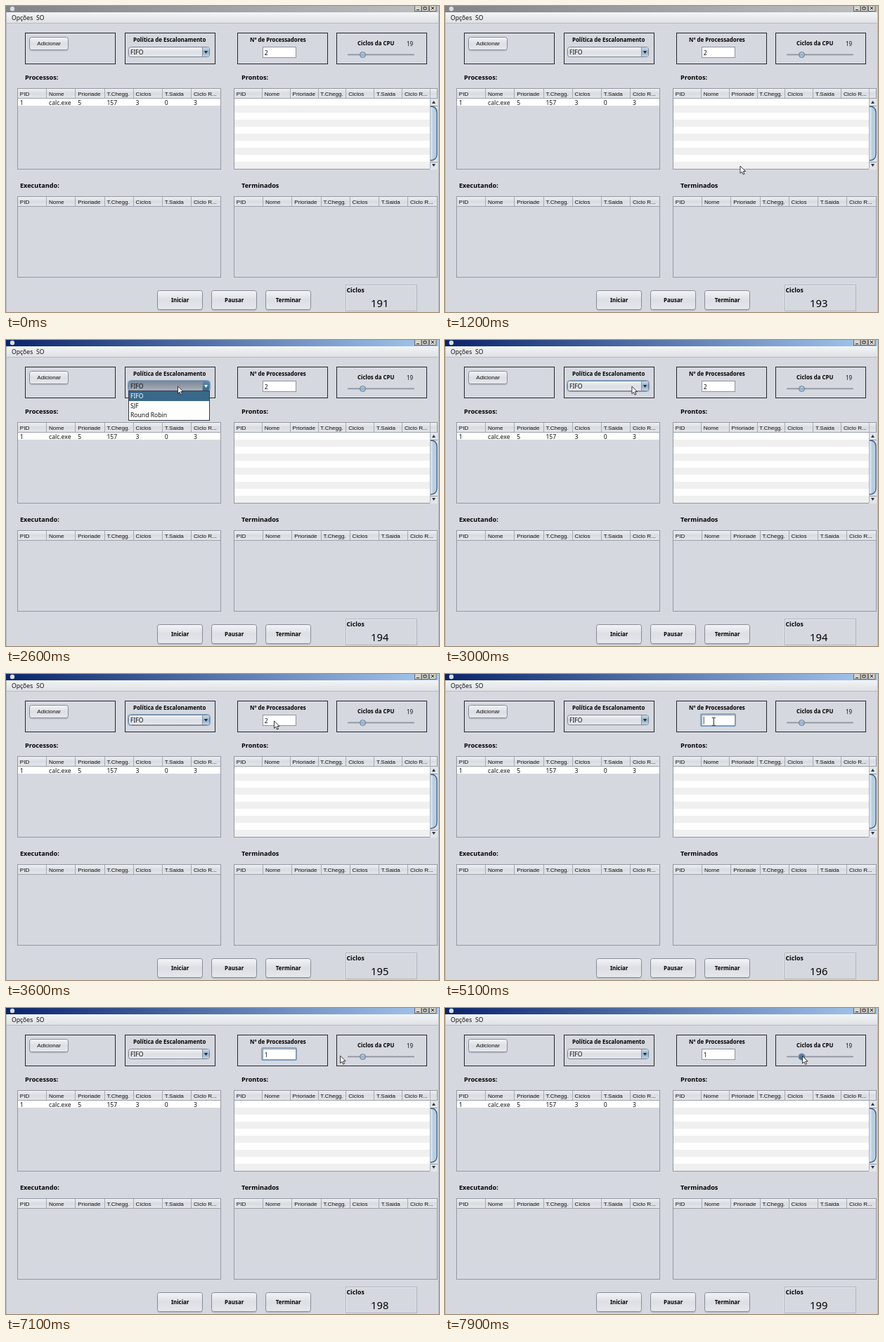
An HTML page that plays this animation: 616 px wide and 436 px high, repeating every 8000 ms.

```html
<!DOCTYPE html>
<html lang="pt">
<head>
<meta charset="utf-8">
<title>Escalonador</title>
<style>
html, body { margin: 0; width: 100%; height: 100%; overflow: hidden; background: #d5d8df; }
svg { display: block; width: 616px; height: 436px; }
text { font-family: "Noto Sans", "DejaVu Sans", sans-serif; font-size: 8.6px; fill: #111; white-space: pre; }
.arial { font-family: "Liberation Sans", Arial, sans-serif; font-size: 8.1px; }
.bold { font-weight: 700; font-size: 7.9px; fill: #000; }
.heading { font-weight: 700; font-size: 9.15px; fill: #000; }
.count { font-size: 14.8px; fill: #000; }
.caption { font-size: 8.8px; font-weight: 600; fill: #000; }
.small { font-size: 8px; }
.mid { text-anchor: middle; }
</style>
</head>
<body>
<svg id="stage" viewBox="0 0 616 436" xmlns="http://www.w3.org/2000/svg">
  <defs>
    <linearGradient id="idle"><stop stop-color="#808489"/><stop offset="1" stop-color="#bfc0c1"/></linearGradient>
    <linearGradient id="active"><stop stop-color="#0a246a"/><stop offset="1" stop-color="#a6caf0"/></linearGradient>
    <linearGradient id="menu" x2="0" y2="1"><stop stop-color="#f3f4f5"/><stop offset="1" stop-color="#dfe1e5"/></linearGradient>
    <linearGradient id="head" x2="0" y2="1"><stop stop-color="#eff0f2"/><stop offset=".5" stop-color="#d9dce1"/><stop offset="1" stop-color="#e4e6ea"/></linearGradient>
    <linearGradient id="button" x2="0" y2="1"><stop stop-color="#f3f4f6"/><stop offset=".5" stop-color="#dcdfe5"/><stop offset="1" stop-color="#e6e8ec"/></linearGradient>
    <linearGradient id="pressed" x2="0" y2="1"><stop stop-color="#7d8592"/><stop offset="1" stop-color="#a9b1bf"/></linearGradient>
    <linearGradient id="blue" x2="0" y2="1"><stop stop-color="#cbd9e6"/><stop offset=".5" stop-color="#93afc8"/><stop offset="1" stop-color="#bdd3e6"/></linearGradient>
    <linearGradient id="deep" x2="0" y2="1"><stop stop-color="#5c86a8"/><stop offset="1" stop-color="#356a92"/></linearGradient>
    <linearGradient id="thumb"><stop stop-color="#e2ebf3"/><stop offset=".5" stop-color="#b5cadd"/><stop offset="1" stop-color="#c4d9ea"/></linearGradient>
  </defs>
</svg>
<script>
const stage = document.getElementById('stage');
const LOOP = 8000, STEP = 100;

function add(tag, attrs, parent = stage) {
  const node = document.createElementNS(stage.namespaceURI, tag);
  for (const key in attrs) node.setAttribute(key, attrs[key]);
  return parent.appendChild(node);
}
const box = (x, y, width, height, fill, stroke = 'none', rx = 0, parent = stage) =>
  add('rect', { x, y, width, height, fill, stroke, rx }, parent);
const path = (d, stroke, fill = 'none', parent = stage, width = 1) =>
  add('path', { d, stroke, fill, 'stroke-width': width }, parent);
const group = () => add('g', {});
const show = (node, on) => node.setAttribute('visibility', on ? 'visible' : 'hidden');

// y is the middle of the capitals
function label(x, y, content, cls = '', parent = stage) {
  const node = add('text', { x, y, class: cls }, parent);
  node.textContent = content;
  node.setAttribute('y', y + parseFloat(getComputedStyle(node).fontSize) * 0.36);
  return node;
}

function windowFrame() {
  box(0, 0, 616, 436, '#d5d8df');
  const title = box(0, 0, 616, 9, 'url(#idle)');
  add('circle', { cx: 9, cy: 4, r: 3.2, fill: '#d9dde2' });
  for (const x of [581, 591, 602]) box(x + .5, -2.5, 9.5, 10, '#d6d3cc', '#66676a');
  path('M584 5.5h4M594 5V1.5h4V5zM605 1l4 4m0-4l-4 4', '#222');
  box(1, 9, 614, 15, 'url(#menu)');
  path('M1 24.5H615', '#b6bac2');
  path('M.5 9V436', '#b4b9c2');
  path('M615.5 9V436', '#b4b9c2');
  label(8, 17, 'Opções');
  label(43, 17, 'SO');
  return title;
}

function pushButton(x, y, w, h, content, cls) {
  box(x + .5, y + 1.5, w, h, '#b9bec8', 'none', 3);
  box(x + .5, y + .5, w, h - 1, 'url(#button)', '#858b97', 3);
  label(x + w / 2 + .7, y + h / 2, content, cls + ' mid');
}

const COLUMNS = ['PID', 'Nome', 'Prioriade', 'T.Chegg.', 'Ciclos', 'T.Saida', 'Ciclo R...'];
function table(x, y, pitch) {
  box(x + .5, y + .5, 289, 115, '#d5d8df', '#9298a3');
  box(x + 1, y + 1, 288, 13, 'url(#head)');
  path(`M${x} ${y + 14.5}h290`, '#9aa0aa');
  COLUMNS.forEach((name, i) => {
    const left = x + i * pitch;
    if (i) path(`M${Math.round(left) + .5} ${y + 1}v13`, '#a5aab4');
    label(left + 3.8, y + 7.8, name, 'arial');
  });
}

function scrollBar() {
  box(603, 132, 11, 101, '#e3e5e9');
  path('M603.5 118V232', '#aeb3bc');
  path('M604 142.5h10M604 222.5h10', '#9298a3');
  path('M606 139l2.5-4 2.5 4zM606 225l2.5 4 2.5-4z', 'none', '#2e3540');
  path('M604 143Q613 143 613 152V211Q613 220 604 220', '#375d80', 'url(#thumb)', stage, 1.3);
}

const title = windowFrame();
for (const x of [27, 169, 329, 470]) box(x + .5, 38.5, 128, 44, 'none', '#25272b');
pushButton(33, 44, 55, 19, 'Adicionar', 'arial');
label(181, 48.3, 'Política de Escalonamento', 'bold');
label(347, 48.3, 'Nº de Processadores', 'bold');
label(500, 53.2, 'Ciclos da CPU', 'bold');
label(570, 53.8, '19', 'small');

const comboRing = box(173.5, 57.5, 117, 16, 'none', '#7ba1c6', 4);
const combo = box(174.5, 58.5, 115, 14, 'url(#button)', '#7c8491', 3);
const comboArrow = path('M280 59H287Q289 59 289 61V70Q289 72 287 72H280z', 'none', 'url(#blue)');
path('M279.5 59V72', '#8496a8');
const comboMark = path('M282 64h5l-2.5 4z', 'none', '#1c2733');
label(177, 66.2, 'FIFO');

const fieldRing = box(363.8, 56.8, 49.4, 17.4, 'none', '#7ba1c6', 2);
fieldRing.setAttribute('stroke-width', 1.6);
box(365.5, 58.5, 47, 15, '#fff', '#8e949f');
const fieldText = label(367.7, 66.5, '2');
const caret = path('M0 60.5V71.5', '#444');

box(486, 68.5, 95, 1.8, '#8d939e', 'none', .9);
const knobRing = add('circle', { cx: 507.5, cy: 69.5, r: 5.2, fill: '#8fb0cf' });
const knob = add('circle', { cx: 507.5, cy: 69.5, r: 4, stroke: '#637a90' });

label(27, 101.5, 'Processos:', 'heading');
label(335, 101.5, 'Prontos:', 'heading');
label(20, 256, 'Executando:', 'heading');
label(335, 256, 'Terminados', 'heading');
table(16, 117, 41.2);
table(324, 117, 39.85);
table(16, 271, 41.2);
table(324, 271, 41.2);
box(17, 132, 288, 10, '#fff');
['1', 'calc.exe', '5', '157', '3', '0', '3'].forEach((value, i) =>
  label(19.8 + i * 41.2, 137.7, value));
for (let i = 0; i < 10; i++)
  box(325, 132 + i * 10, 278, 10, i % 2 ? '#f0f0f1' : '#fff');
scrollBar();

['Iniciar', 'Pausar', 'Terminar'].forEach((name, i) => pushButton(215 + i * 77, 405, 64, 28, name, 'bold'));
box(483.5, 397.5, 101, 37, 'none', '#b2b6be');
path('M484.5 434V398.5H584', '#e8eaee');
label(484.5, 404.7, 'Ciclos', 'caption');
const counter = label(531.8, 423.5, '191', 'count mid');

const list = group();
box(174.5, 72.5, 115, 42, '#fff', '#343a43', 0, list);
box(175, 73, 114, 14, '#39698a', 'none', 0, list);
['FIFO', 'SJF', 'Round Robin'].forEach((name, i) => {
  const item = label(177, 80.3 + i * 13.4, name, '', list);
  if (!i) item.style.fill = '#fff';
});

const arrow = group();
path('M0 0V10.4L2.5 8.2 4.2 12 6 11.2 4.3 7.5H7.6z', '#222', '#fff', arrow, .9);
const beam = group();
path('M-2.5 -5.5H-.6L0 -5 .6 -5.5H2.5M0 -5V5M-2.5 5.5H-.6L0 5 .6 5.5H2.5', '#222', 'none', beam);

// time, x, y
const MOVES = [
  [800, 452, 258], [900, 438, 244], [1200, 420, 228], [1800, 244.5, 66],
  [2800, 244.5, 66], [3600, 381.5, 67], [6500, 381.5, 67], [7400, 508.5, 68.5], [LOOP, 508.5, 68.5]
];
const TICKS = [100, 1200, 2200, 3300, 4300, 5400, 6300, 7400];
const within = (t, a, b) => t >= a && t < b;

function pointer(t) {
  const i = Math.max(1, MOVES.findIndex(m => m[0] > t));
  const [t0, x0, y0] = MOVES[i - 1], [t1, x1, y1] = MOVES[i];
  const k = (t - t0) / (t1 - t0), ease = k * k * (3 - 2 * k);
  return `translate(${x0 + (x1 - x0) * ease} ${y0 + (y1 - y0) * ease})`;
}

function render(t) {
  const open = within(t, 2100, 2800);
  const typing = within(t, 3800, 6600);
  const sliding = t >= 7500;
  const digit = t < 4700 ? '2' : t < 5700 ? '' : '1';

  title.setAttribute('fill', t < 2000 ? 'url(#idle)' : 'url(#active)');
  counter.textContent = 191 + TICKS.filter(tick => tick <= t).length;

  show(comboRing, within(t, 2000, 3800));
  combo.setAttribute('fill', open ? 'url(#pressed)' : 'url(#button)');
  comboArrow.setAttribute('fill', open ? 'url(#deep)' : 'url(#blue)');
  comboMark.setAttribute('fill', open ? '#fff' : '#1c2733');
  show(list, open);

  fieldText.textContent = digit;
  show(fieldRing, within(t, 3800, 7500));
  caret.setAttribute('transform', `translate(${digit ? 373.5 : 368.2} 0)`);
  show(caret, within(t, 3900, 5400) || within(t, 5700, 6000) || within(t, 6200, 6700) || within(t, 7200, 7500));

  show(knobRing, sliding);
  knob.setAttribute('fill', sliding ? 'url(#deep)' : 'url(#blue)');

  const place = pointer(t);
  arrow.setAttribute('transform', place);
  beam.setAttribute('transform', place + ' translate(.8 .8)');
  show(arrow, t >= 800 && !typing);
  show(beam, typing);
}

function frame(now) {
  render(Math.floor(now % LOOP / STEP) * STEP);
  requestAnimationFrame(frame);
}
render(0);
requestAnimationFrame(frame);
</script>
</body>
</html>
```
